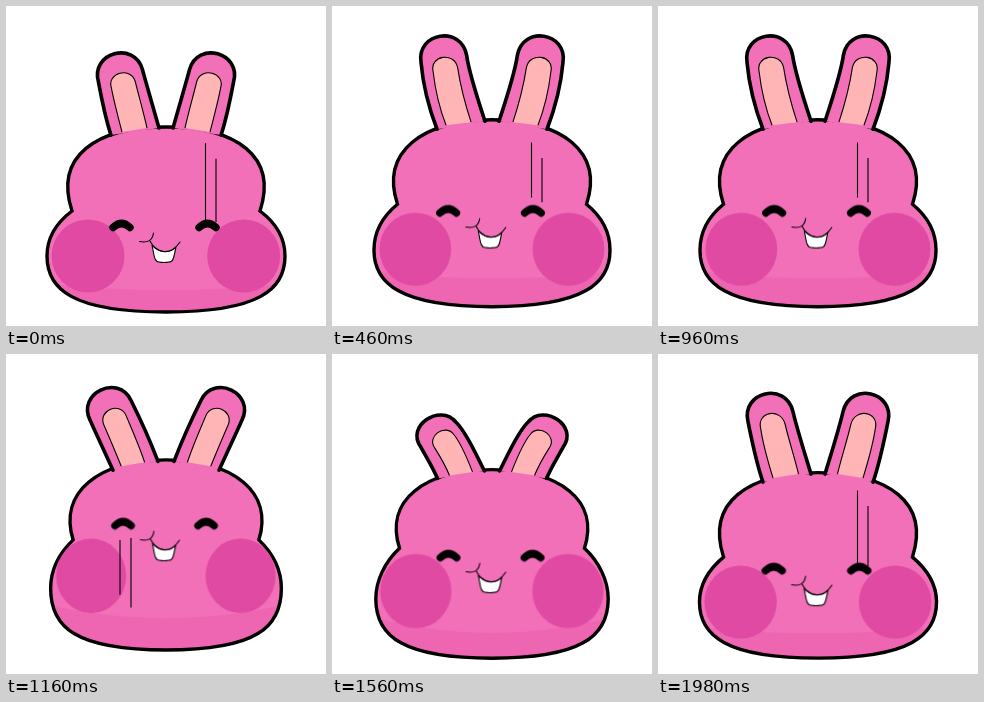
These frames come from a looping animation (320 by 320 pixels, 2000 ms). An HTML page without scripts:

```html
<!DOCTYPE html>
<html lang="en">
<head>
<meta charset="utf-8">
<title>Bouncing bunny</title>
<style>
html, body { margin: 0; width: 100%; height: 100%; overflow: hidden; background: #fff; }
svg { display: block; width: 100vw; height: 100vh; }

/* one hop takes 250 ms */
.body, .light, .ear, .inner, .face, .cheeks, .streak { animation: body .25s linear infinite; }
.body { fill: #ee66b2; }
.line { fill: none; stroke: #000; stroke-width: 3.4; }
.light { fill: #f270b8; animation-name: light; }
.ear { fill: #f270b8; stroke: #000; stroke-width: 3.6; stroke-linecap: round; animation-name: ear; }
.inner { fill: #ffb5b5; stroke: #000; stroke-width: 1.1; animation-name: inner; }
.cheeks { fill: #e04aa3; transform-origin: 160px 250px; animation-name: cheeks; }
.face { fill: none; stroke: #000; stroke-width: 1.1; stroke-linecap: round; transform-origin: 160px 0; animation-name: face; }
.eye { stroke-width: 7.4; }
.streak { fill: none; stroke: #000; stroke-width: 1.1; animation-name: streak; }
.up { animation-delay: -102ms; }

@keyframes body {
  0%, 4% { d: path("M160 306C66 306 41 283 41 250C41 232 50 217 66 205C48 150 90 121 160 121"); animation-timing-function: cubic-bezier(.4,0,.8,.8); }
  36% { d: path("M160 302.5C78 302.5 46.5 283 46.5 240C46.5 222 55 200 69 184C56 142 95 111 160 110.5"); animation-timing-function: ease-out; }
  72% { d: path("M160 295.5C68 295.5 44.5 272 44.5 234C44.5 217 51 201 67 186C52 138 92 106 160 105.5"); }
  84% { d: path("M160 300.5C68 300.5 42 277 42 244C42 226 49.5 211 65.5 198C48 145 91 114 160 113.5"); }
  92% { d: path("M160 304C67 304 41.5 281 41.5 248C41.5 230 50 216 65.5 203C48 148 90 119 160 118.5"); }
  100% { d: path("M160 306C66 306 41 283 41 250C41 232 50 217 66 205C48 150 90 121 160 121"); }
}
@keyframes light {
  0%, 4%, 100% { d: path("M-20 0H340V271Q160 297 -20 271Z"); }
  36% { d: path("M-20 0H340V228Q160 324 -20 228Z"); }
  72% { d: path("M-20 0H340V235Q160 287 -20 235Z"); }
  84% { d: path("M-20 0H340V256Q160 288 -20 256Z"); }
  92% { d: path("M-20 0H340V265Q160 293 -20 265Z"); }
}
@keyframes ear {
  0%, 100% { d: path("M105 129C99 110 96 94 92.6 75C84.7 46 128.7 34 136.6 63C141 80 148 104 153 122"); }
  4% { d: path("M104 130C98 112 95 99 90.8 83C80.6 53 125 38 135 68C140.5 83 148 104 153 122"); animation-timing-function: cubic-bezier(.4,0,.8,.8); }
  36% { d: path("M107 119C101 110 94 108 87 103C66 90 92 60 113 68C130 75 140 98 152 112"); animation-timing-function: ease-out; }
  72% { d: path("M107 116C98 96 91 80 83.8 63.4C71.3 35.4 113.3 16.6 125.8 44.6C134 63 146 90 152 107"); }
  84% { d: path("M105 123C97 102 91 80 89 56C84.2 25.8 129.6 18.6 134.6 49C137 66 146 94 153 115"); }
  92% { d: path("M105 128C98 108 94 87 89.8 67C83 37.3 127.7 27 134.8 57C139 75 147 100 153 120"); }
}
@keyframes inner {
  0%, 100% { d: path("M116 126C112 110 108 95 105.5 81C101 66 125 60 129.5 75C133 90 138 108 141 122"); }
  4% { d: path("M116 127C111 112 108 101 103.7 87C98.7 72 122 64 127 80C131 91 138 110 141 123"); animation-timing-function: cubic-bezier(.4,0,.8,.8); }
  36% { d: path("M119 116C114 107 109 105 102 101C90 92 104 75 116 80C126 86 133 100 140 113"); animation-timing-function: ease-out; }
  72% { d: path("M115 112C109 97 103 82 97.7 69C91.6 54 114 45 120.3 60C126 75 134 93 138.5 108"); }
  84% { d: path("M114 119C107 101 103 82 101 65C97.5 49 122 45 125.5 61C128 78 133 98 139 116"); }
  92% { d: path("M115 124C110 108 105 91 102.5 74C98.5 57 122.5 53 127 70C131 87 137 105 140.5 120"); }
}
@keyframes cheeks {
  0%, 4% { transform: none; animation-timing-function: cubic-bezier(.4,0,.8,.8); }
  36% { transform: translateY(-25.5px) scale(.955,1.035); animation-timing-function: ease-out; }
  56% { transform: translateY(-31px) scale(.955,1.025); animation-timing-function: ease-in; }
  72% { transform: translateY(-23px) scale(.968,1.01); }
  84% { transform: translateY(-7px) scale(.983,1); }
  92% { transform: translateY(-2px) scale(.992,1); }
  100% { transform: none; }
}
@keyframes face {
  0%, 4% { transform: none; animation-timing-function: cubic-bezier(.4,0,.8,.8); }
  36% { transform: translateY(-35px) scaleX(.955); animation-timing-function: ease-out; }
  56% { transform: translateY(-52px) scaleX(.96); animation-timing-function: ease-in; }
  72% { transform: translateY(-45.5px) scaleX(.975); }
  84% { transform: translateY(-15px) scaleX(.985); }
  92% { transform: translateY(-5px) scaleX(.995); }
  100% { transform: none; }
}
/* each streak draws itself, then is wiped from its start */
@keyframes streak {
  0% { stroke-dasharray: 100 200; stroke-dashoffset: 0; }
  4% { stroke-dasharray: 100 200; stroke-dashoffset: -10; }
  13% { stroke-dasharray: 100 200; stroke-dashoffset: -64; }
  20% { stroke-dasharray: 100 200; stroke-dashoffset: -101; }
  20.1%, 69% { stroke-dasharray: 0 200; stroke-dashoffset: 0; }
  72% { stroke-dasharray: 12 200; stroke-dashoffset: 0; }
  84% { stroke-dasharray: 68 200; stroke-dashoffset: 0; }
  92% { stroke-dasharray: 94 200; stroke-dashoffset: 0; }
  100% { stroke-dasharray: 100 200; stroke-dashoffset: 0; }
}
</style>
</head>
<body>
<svg viewBox="0 0 320 320">
  <defs>
    <clipPath id="shape">
      <path class="body"/>
      <path class="body" transform="matrix(-1 0 0 1 320 0)"/>
    </clipPath>
  </defs>

  <path class="body"/>
  <path class="body" transform="matrix(-1 0 0 1 320 0)"/>
  <g clip-path="url(#shape)"><path class="light"/></g>
  <path class="body line"/>
  <path class="body line" transform="matrix(-1 0 0 1 320 0)"/>

  <g>
    <path class="ear"/>
    <path class="inner"/>
  </g>
  <g transform="matrix(-1 0 0 1 320 0)">
    <path class="ear"/>
    <path class="inner"/>
  </g>

  <g class="cheeks">
    <circle cx="82" cy="250" r="36.5"/>
    <circle cx="237.7" cy="250" r="36.5"/>
  </g>

  <path class="streak" pathLength="100" d="M199.5 136.5V216"/>
  <path class="streak" pathLength="100" d="M210 152V216"/>
  <path class="streak up" pathLength="100" d="M114 252V186"/>
  <path class="streak up" pathLength="100" d="M125 268V184"/>

  <g class="face">
    <path class="eye" d="M107 221.5Q115.5 213.5 124 221.5"/>
    <path class="eye" d="M193 221.5Q201.5 213.5 210 221.5"/>
    <path d="M133.5 235.5Q146 238 147.5 227"/>
    <path fill="#fff" d="M146 239C148 248 148 256 153 256Q158 257 163 256C168 256 168 249 170 241C164 248 152 247 146 239Z"/>
    <path d="M144 235C149 245 163 252 174 236"/>
  </g>
</svg>
</body>
</html>
```
